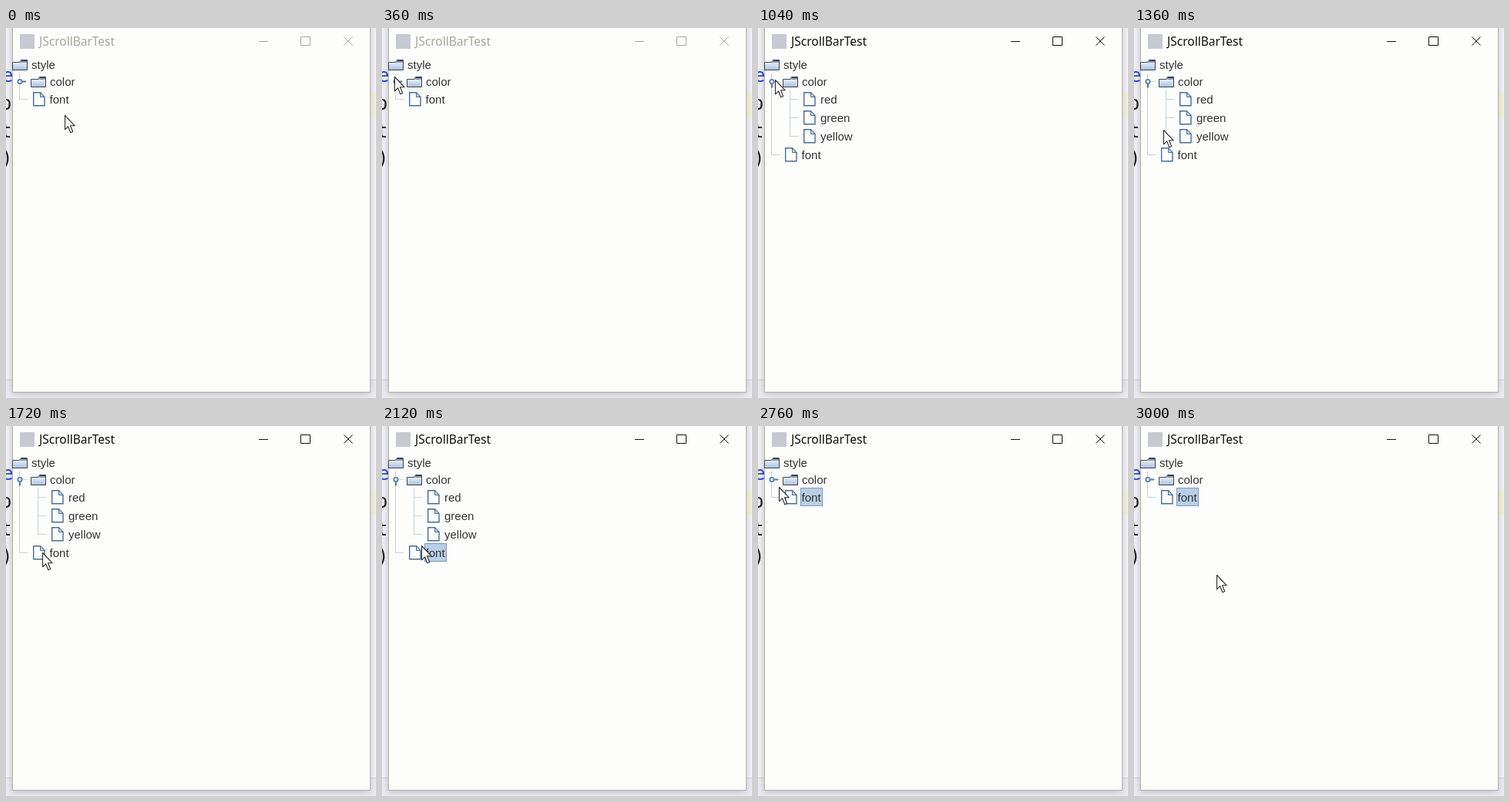
Recreate the animation shown at these times as an HTML page. Size 480 by 480 pixels, loop 3040 ms.

```html
<!DOCTYPE html>
<html lang="en">
<head>
<meta charset="utf-8">
<title>Tree window</title>
<style>
  html, body { margin: 0; width: 100%; height: 100%; overflow: hidden; }
  svg { display: block; width: 100vw; height: 100vh; }
  .tree text { font: 15px "Liberation Sans", Arial, sans-serif; fill: #333333; }
  .code text { font: 24px "DejaVu Sans Mono", monospace; fill: #1c1c1c; }
  .title { font: 15.5px "Noto Sans", "Open Sans", sans-serif; }
  .window { filter: drop-shadow(0 2px 4px rgba(40, 40, 60, .28)); }
  .lines { fill: none; stroke: #c8d2dc; }
</style>
</head>
<body>
<svg viewBox="0 0 480 480">
  <defs>
    <linearGradient id="folderFill" x1="0" y1="0" x2="0" y2="1">
      <stop offset="0" stop-color="#ffffff"/>
      <stop offset="1" stop-color="#a9c0dc"/>
    </linearGradient>
    <g id="folder" stroke="#3c4450">
      <path d="M.5 14.5V4.5H9.5L11.5 1.5H19.5V14.5Z" fill="url(#folderFill)"/>
      <path d="M11.5 2.5H19.5" fill="none" stroke-width="2"/>
      <path d="M10 4.5H19" fill="none" stroke="#8796a8"/>
    </g>
    <g id="file" stroke="#4a6c92" stroke-width="1.4">
      <path d="M.7.7H9.5L15 6.5V17.7H.7Z" fill="#fdfdfd"/>
      <path d="M9.5.7V6.5H15Z" fill="#c4d6ea" stroke-width="1"/>
    </g>
    <g id="handle" stroke="#5579a0">
      <path d="M0 2V8" stroke-width="2"/>
      <circle r="2.7" fill="#dce8f4" stroke-width="1.6"/>
    </g>
  </defs>

  <rect width="480" height="480" fill="#f2f2f5"/>
  <path d="M0 456H480V480H0Z" fill="#ebebf1"/>
  <path d="M0 456.5H480" stroke="#d2d2d8"/>
  <path d="M472 84H480V115H472Z" fill="#f2f2dc"/>
  <g class="code">
    <text x="-5" y="70" style="fill:#2a48dc">e</text>
    <text x="-7" y="106">o</text>
    <text x="-7" y="142">t</text>
    <text x="-6" y="177">)</text>
  </g>

  <rect class="window" x="8" y="-8" width="464" height="480" fill="#fdfdfb"/>
  <path d="M8.5 0V472.5H472.5V0" fill="none" stroke="#b2b2a4"/>
  <rect x="18" y="8" width="19" height="19" fill="#c6cad0"/>
  <g id="bar">
    <text class="title" x="43" y="23" fill="currentColor">JScrollBarTest</text>
    <path d="M328 17.5H340M382.5 11.5H394.5V22.5H382.5ZM438.5 11.5L449.5 22.5M449.5 11.5L438.5 22.5"
      fill="none" stroke="currentColor"/>
  </g>

  <g class="tree">
    <path id="trunk" class="lines"/>
    <use href="#folder" x="8" y="40"/>
    <text x="33" y="53">style</text>
    <use id="knob" href="#handle"/>
    <use href="#folder" x="32" y="62"/>
    <text x="57" y="75">color</text>
    <g id="children">
      <path class="lines" d="M41.5 80V140.5H52M41.5 92.5H52M41.5 116.5H52"/>
    </g>
    <g id="font">
      <rect id="selection" x="55.5" y="-11.5" width="28" height="23" fill="#b8cfe5" stroke="#7d96b8"/>
      <use href="#file" x="35" y="-9"/>
      <text x="56.6" y="6">font</text>
    </g>
  </g>

  <path id="cursor" d="M.5.5V18.8L4.6 14.8 7.8 22.8 10.7 21.5 7.5 13.7H13Z"
    fill="#ffffff" stroke="#2c2c2c" stroke-width="1.1" stroke-linejoin="round"/>
</svg>

<script>
const LOOP = 3040, STEP = 40;
const EXPAND = 680, SELECT = 1840, COLLAPSE = 2680;

// Pointer path: time, x, y
const path = [
  [0, 76, 113], [360, 16, 63], [560, 18, 66], [1040, 22, 67],
  [1160, 22, 67], [1520, 49, 179], [1720, 47, 164], [1960, 51, 157],
  [2080, 51, 157], [2120, 51, 155], [2240, 60, 163], [2480, 22, 81],
  [2640, 16, 65], [2720, 17, 66], [2920, 114, 190], [3000, 107, 193]
];

const el = id => document.getElementById(id);
const show = (id, on) => el(id).style.display = on ? "" : "none";
const place = (id, x, y, turn = 0) =>
  el(id).setAttribute("transform", `translate(${x} ${y}) rotate(${turn})`);

["red", "green", "yellow"].forEach((name, i) => {
  const y = 92 + 24 * i;
  el("children").insertAdjacentHTML("beforeend",
    `<use href="#file" x="59" y="${y - 9}"/><text x="81" y="${y + 6}">${name}</text>`);
});

function pointer(t) {
  const i = path.findIndex(key => key[0] > t);
  if (i < 0) return path[path.length - 1].slice(1);
  const [t0, x0, y0] = path[i - 1], [t1, x1, y1] = path[i];
  const p = (t - t0) / (t1 - t0);
  const k = t1 - t0 > 120 ? p * p * (3 - 2 * p) : p;
  return [x0 + (x1 - x0) * k, y0 + (y1 - y0) * k].map(Math.round);
}

function draw(time) {
  const t = Math.floor(time % LOOP / STEP) * STEP;
  const open = t >= EXPAND && t < COLLAPSE;
  const fontY = open ? 164 : 92;
  el("bar").style.color = t >= EXPAND ? "#111111" : "#a8a89c";
  el("trunk").setAttribute("d", `M17.5 59V${fontY + .5}H28M17.5 69.5H28`);
  place("knob", 18, 69.5, open ? 0 : -90);
  place("font", 0, fontY);
  place("cursor", ...pointer(t));
  show("children", open);
  show("selection", t >= SELECT);
}

const start = performance.now();
function tick() {
  draw(performance.now() - start);
  requestAnimationFrame(tick);
}
tick();
</script>
</body>
</html>
```
